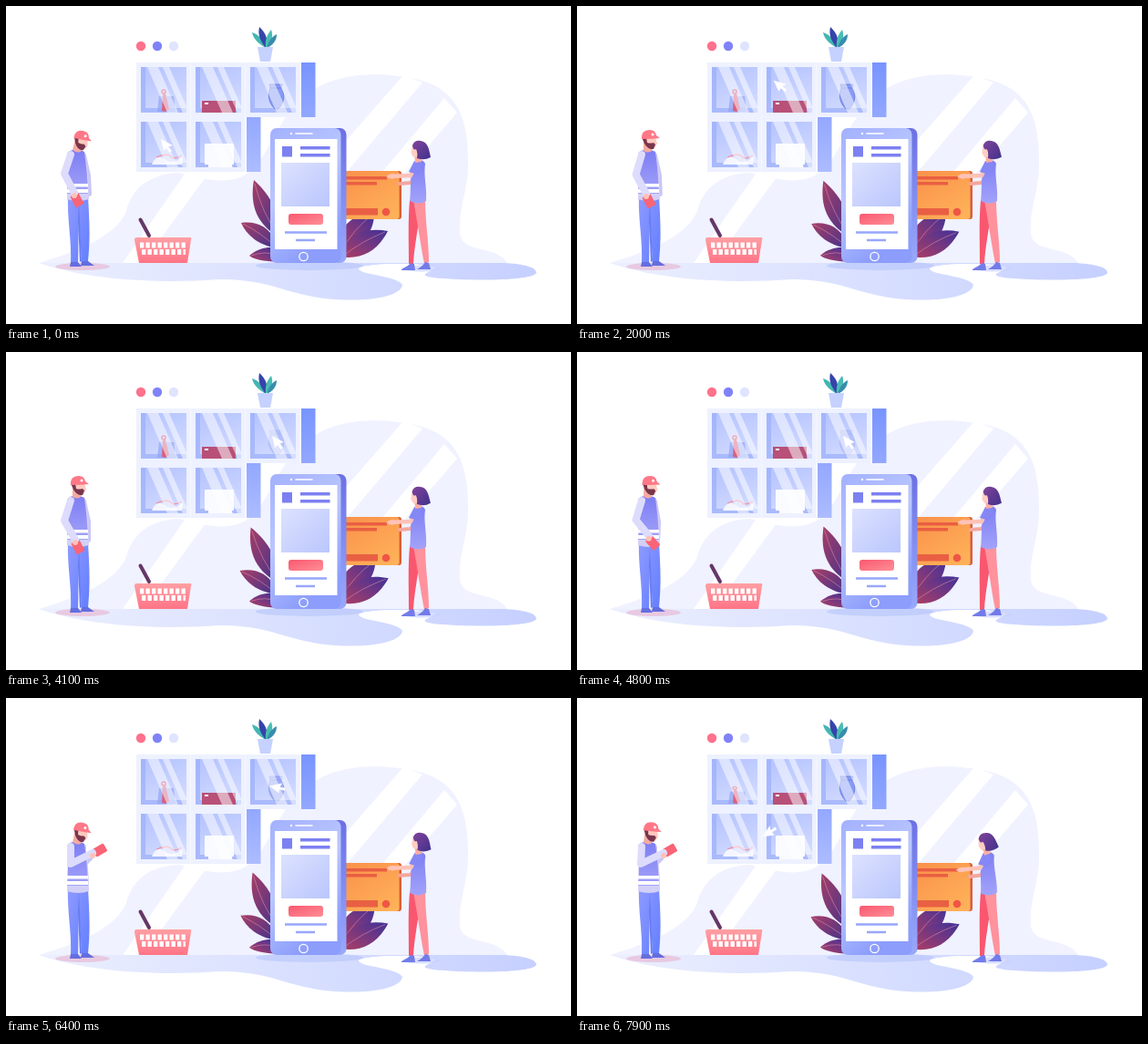
An HTML page that plays this animation: 620x349 px, repeating every 8000 ms.

```html
<!DOCTYPE html>
<html lang="en">
<head>
<meta charset="utf-8">
<title>Online shopping</title>
<style>
html, body { margin: 0; width: 100%; height: 100%; overflow: hidden; background: #fff; }
svg { display: block; width: 100%; height: 100%; }
</style>
</head>
<body>
<svg viewBox="0 0 620 349">
<defs>
  <linearGradient id="ground"><stop stop-color="#eceffe"/><stop offset=".5" stop-color="#d9e0ff"/><stop offset="1" stop-color="#c6d0ff"/></linearGradient>
  <linearGradient id="panel" x2="0" y2="1"><stop stop-color="#7894ff"/><stop offset="1" stop-color="#adbcff"/></linearGradient>
  <linearGradient id="window" x2=".4" y2="1"><stop stop-color="#b3c2ff"/><stop offset="1" stop-color="#d0d9ff"/></linearGradient>
  <linearGradient id="phone" x2=".4" y2="1"><stop stop-color="#a3b0ff"/><stop offset=".5" stop-color="#bac7ff"/><stop offset="1" stop-color="#8c9dfb"/></linearGradient>
  <linearGradient id="side" x2="0" y2="1"><stop stop-color="#6c70e4"/><stop offset="1" stop-color="#98a9fb"/></linearGradient>
  <linearGradient id="tile" x2="1" y2="1"><stop stop-color="#dde2ff"/><stop offset="1" stop-color="#bac6fd"/></linearGradient>
  <linearGradient id="red" x2="1" y2="1"><stop stop-color="#f9586f"/><stop offset="1" stop-color="#ff8f98"/></linearGradient>
  <linearGradient id="rose" x2="0" y2="1"><stop stop-color="#ff9fa4"/><stop offset="1" stop-color="#ff7486"/></linearGradient>
  <linearGradient id="card" x2="1" y2="1"><stop stop-color="#f98b48"/><stop offset="1" stop-color="#ffb45a"/></linearGradient>
  <linearGradient id="leaf" x2="1" y2="1"><stop stop-color="#a53e67"/><stop offset="1" stop-color="#40328e"/></linearGradient>
  <linearGradient id="leaf2" x1="1" x2="0" y2="1"><stop stop-color="#403199"/><stop offset="1" stop-color="#b03e63"/></linearGradient>
  <linearGradient id="vest" x2="0" y2="1"><stop stop-color="#7c7df3"/><stop offset="1" stop-color="#a3a3fa"/></linearGradient>
  <linearGradient id="jeans" x2="1" y2="1"><stop stop-color="#8f9aff"/><stop offset="1" stop-color="#637fff"/></linearGradient>
  <linearGradient id="hair" x2="1" y2="1"><stop stop-color="#81439a"/><stop offset="1" stop-color="#41318c"/></linearGradient>
  <g id="frame">
    <rect width="60" height="60" fill="#eef1ff"/>
    <path d="M60 0V60" stroke="#fff"/>
    <rect x="5" y="5" width="50" height="50" fill="url(#window)"/>
    <path d="M5 5H10V50H55V55H5Z" fill="#9eb1fb" opacity=".75"/>
  </g>
  <path id="glass" d="M12 5H24L46 55H34ZM29 5H36L55 48V55H51Z" fill="#fff" opacity=".52"/>
</defs>

<!-- backdrop -->
<path d="M36 282C70 272 120 255 132 225C138 200 158 184 190 183C225 193 255 198 275 175C295 148 300 122 330 97C365 70 415 73 449 80C500 91 508 130 507 178C506 205 496 225 498 250C501 272 538 262 550 282Z" fill="#f0f2ff"/>
<path d="M436 76L457 84L330 234L310 220ZM481 101L495 117L395 233L360 245ZM197 183L222 184L150 282H128Z" fill="#fff"/>
<path d="M36 282H548C575 284 582 288 582 293C578 301 520 302 480 299C450 297 455 292 470 288C465 281 400 282 388 287C380 294 431 296 435 306C434 319 395 326 350 321C300 314 290 300 235 300C170 305 90 301 36 282Z" fill="url(#ground)"/>
<path d="M388 288C400 281 460 282 472 287C466 292 455 294 462 297C445 301 430 299 416 296C402 294 388 293 388 288Z" fill="#fff"/>

<!-- shelf -->
<g fill="#dfe4ff"><circle cx="148" cy="44" r="5.2" fill="#ff718c"/><circle cx="166" cy="44" r="5.2" fill="#8083f8"/><circle cx="184" cy="44" r="5.2"/></g>
<path d="M285 46C279 42 272 38 270 29C277 31 283 37 285 46Z" fill="#43b6b2"/>
<path d="M285 46C279 38 276 32 278 23C286 30 288 38 285 46Z" fill="#3544a9"/>
<path d="M285 46C284 38 286 32 291 26C294 34 291 41 285 46Z" fill="#48bdb2"/>
<path d="M286 46C288 39 291 34 297 31C297 38 293 43 286 46Z" fill="#378dad"/>
<path d="M276 45H293L290 61H279Z" fill="#c5d1ff"/>
<path d="M324 62H339.500V122H324ZM264 122H279.500V182H264Z" fill="url(#panel)"/>
<g id="frames"></g>
<g id="bottle">
  <path d="M166 116L168 99H184L186 116Z" fill="#8ea2f4" opacity=".65"/>
  <circle cx="173" cy="94" r="2" fill="none" stroke="#df506f" stroke-width="1.500"/>
  <path d="M172 97L175 96L179 113L175 116L171 115Z" fill="#da617f"/>
</g>
<path d="M215 104H252V117H215Z" fill="#b85078"/><path d="M218 106H222V108H218Z" fill="#fff"/>
<g id="vase" fill="#879bf5" stroke="#6574d9" stroke-width=".8">
  <path d="M289 86H303L302 90C307 98 305 106 299 113H295C288 106 287 98 290 90Z"/><path d="M290 90H302" />
</g>
<path d="M155 174H194V177H155Z" fill="#a9bbfb"/>
<path d="M160 174C164 165 169 164 174 168C181 174 187 170 194 166L193 174Z" fill="#f4f5ff"/>
<path d="M165 166Q178 160 183 167Q188 167 193 164" fill="none" stroke="#f190a8" stroke-width="1.300"/>
<path d="M218 151H250V174H218ZM222 174H248V177H222Z" fill="#fafbff"/>
<g id="panes"></g>
<path id="cursor" d="M-6 -7L7 0L2 1.500L6 6L3.500 8L0 3L-3 6Z" fill="#fff"/>

<!-- basket -->
<path d="M147.500 234.500L157 252" stroke="#653767" stroke-width="4" stroke-linecap="round"/>
<path d="M143 254H202Q204 254 203 257L199 282H146L141 257Q141 254 143 254Z" fill="url(#rose)"/>
<path d="M147 262.500H199M149 270H197" stroke="#fff" stroke-width="6" stroke-dasharray="4.300 2.200"/>

<!-- phone and plants -->
<ellipse cx="333" cy="285" rx="59" ry="5" fill="#b9c6fb" opacity=".65"/>
<g id="leaves"></g>
<g id="card">
  <rect x="350" y="181" width="84" height="53" rx="3" fill="#d85d3c"/>
  <rect x="350" y="181" width="81.500" height="53" rx="3" fill="url(#card)"/>
  <path d="M360 187H418V190.500H360ZM360 193H407V196.500H360ZM360 222H408V229.500H360Z" fill="#e95f43"/>
  <circle cx="417" cy="226" r="4.300" fill="#ef5545"/>
</g>
<rect x="294" y="134" width="79.500" height="148" rx="7" fill="url(#side)"/>
<rect x="290" y="134" width="77.500" height="148" rx="7" fill="url(#phone)"/>
<rect x="295" y="146" width="68.500" height="121" fill="#fff"/>
<path d="M318 140H336" stroke="#fff" stroke-width="1.600" stroke-linecap="round"/><circle cx="313" cy="140" r="1.200" fill="#fff"/>
<path d="M303 154H314V165.500H303ZM323 154H355.500V157.500H323ZM323 162H355.500V165.500H323Z" fill="#7c80f1"/>
<rect x="302" y="172" width="53" height="48" fill="url(#tile)"/>
<rect x="310" y="228" width="38" height="12" rx="3" fill="url(#red)"/>
<path d="M306 248.500H352M318 257H339" stroke="#98a7fb" stroke-width="2.700"/>
<circle cx="326.500" cy="275" r="4.700" fill="none" stroke="#fff" stroke-width="1.300"/>

<!-- woman -->
<ellipse cx="456" cy="288" rx="21" ry="3.500" fill="#c8d2ff" opacity=".7"/>
<path d="M443 213H455C454 240 448 260 447 283H442C442 260 441 235 443 213Z" fill="#f9576f"/>
<path d="M447 213H460C460 235 464 260 464 281L459 283C455 263 452 240 447 213Z" fill="#ff929c"/>
<path d="M434 289Q442 285 444 282L448 283L449 290H434ZM451 289Q458 285 460 281L464 282L466 289Z" fill="#737be9"/>
<g id="woman">
  <path d="M450 185L444 194L432 195" fill="none" stroke="#f5a59d" stroke-width="4" stroke-linecap="round" stroke-linejoin="round"/>
  <path d="M449 170Q457 167 460 173C458 186 462 198 461 214Q453 219 443 214C445 204 442 184 449 170Z" fill="url(#vest)"/>
  <path d="M448 178L444 186L421 187" fill="none" stroke="#ffc2b7" stroke-width="4.500" stroke-linecap="round" stroke-linejoin="round"/>
  <path d="M417 187L424 184L430 186L424 190Z" fill="#ffc2b7"/>
  <path d="M448 170L457 173L452 185L442 182Z" fill="#8587f5"/>
  <g id="womanHead">
    <path d="M448 160H456V171L449 172Z" fill="#f8ada5"/>
    <path d="M446 152L445 158L444.500 161L447 166L454 165V151Z" fill="#ffcdc3"/>
    <path d="M446 153Q448 147 455 148C463 149 464 157 466 166Q459 170 451 167Q452 161 450 157Q447 159 446 153Z" fill="url(#hair)"/>
  </g>
</g>

<!-- man -->
<ellipse cx="84" cy="286" rx="30" ry="4" fill="#e8c3dc" opacity=".85"/>
<path id="farArm" fill="none" stroke="#c9c7f6" stroke-width="6" stroke-linecap="round" stroke-linejoin="round"/>
<path d="M68 208H90C91 230 93 250 90 280H83L80 233L79 281H71C72 255 67 235 68 208Z" fill="url(#jeans)"/>
<path d="M80 214L83 280L81 281L79 234Z" fill="#687cf2"/>
<path d="M71 281H79L83 286H70ZM83 280H90L97 285H82Z" fill="#636edf"/>
<path d="M69 160Q78 156 86 160Q91 180 91 212Q79 216 67 212Q68 185 67 162Z" fill="#d3d0f8"/>
<path d="M70 159Q79 156 86 160Q89 180 90 206H67Q69 185 67 162Z" fill="url(#vest)"/>
<path d="M67 195H90V198.500H67ZM67 201H90V205H67Z" fill="#fff"/>
<g id="manHead">
  <path d="M73 149H82V159Q78 162 73 159Z" fill="#f4aaa2"/>
  <path d="M74 144H86L88 151L85 156L76 155Z" fill="#ffc9be"/>
  <path d="M71 144H76L77 150Q80 151 84 150L86 152L84 157Q78 158 74 151Z" fill="#78364c"/>
  <path d="M71 146Q70 136 80 136Q86 136 87 142L91 145Q82 146 71 146Z" fill="#ff7887"/>
  <circle cx="83" cy="141" r="1.500" fill="#fff"/>
</g>
<rect id="device" x="-7" y="-5" width="14" height="10" rx="1.500" fill="#f96476"/>
<path id="nearArm" fill="none" stroke="#dddcfc" stroke-width="8" stroke-linecap="round" stroke-linejoin="round"/>
<circle id="hand" r="3" fill="#ffc2b7"/>
</svg>

<script>
const LOOP = 8000;
const el = id => document.getElementById(id);
const set = (id, name, value) => el(id).setAttribute(name, value);
const move = (id, value) => set(id, 'transform', value);

const cells = [[143, 62], [203, 62], [263, 62], [143, 122], [203, 122]];
const copies = id => cells.map(([x, y]) => `<use href="#${id}" x="${x}" y="${y}"/>`).join('');
el('frames').innerHTML = copies('frame');
el('panes').innerHTML = copies('glass');

// outline, vein, fill, pivot, sway in degrees
const leaves = [
  ['M300 254C276 240 267 220 272 191C291 208 301 229 300 254Z', 'M273 195Q281 227 299 252', 'leaf', '299 256', -3],
  ['M298 266C278 263 264 252 258 238C278 235 294 246 298 266Z', 'M260 239Q280 249 297 265', 'leaf', '298 266', -3],
  ['M299 281C282 280 272 278 267 274C278 264 291 264 299 266Z', 'M269 274Q285 268 298 274', 'leaf2', '299 274', 1],
  ['M366 270C363 246 375 230 404 225C405 248 391 264 366 270Z', 'M402 229Q380 246 369 268', 'leaf2', '368 270', 2],
  ['M366 275C374 248 397 243 419 247C407 270 389 279 366 275Z', 'M416 248Q390 258 369 275', 'leaf2', '368 275', 1.5]
];
el('leaves').innerHTML = leaves.map(([shape, vein, fill], i) =>
  `<g id="leaf-${i}"><path d="${shape}" fill="url(#${fill})"/><path d="${vein}" fill="none" stroke="#d78ba3" stroke-width=".6"/></g>`).join('');

// Each row is a time in seconds followed by its values
const cursor = [[0, 176, 153, 0], [.9, 174, 144, -50], [1.1, 175, 133, -70], [1.8, 205, 98, -30],
  [2.3, 255, 77, 10], [2.8, 291, 98, 20], [3.6, 298, 99, 0], [5.6, 298, 99, 0],
  [6.4, 298, 98, -40], [7.2, 258, 112, -70], [7.9, 211, 147, -85]];
const sway = [[0, 0], [1.2, 1], [2.75, 0], [4.05, 1], [5.4, 0], [6.4, .4], [7.9, 1]];
const manHead = [[0, 14], [.9, 0], [4.3, 0], [5.4, 7], [6.3, 13], [7.9, 8]];
// elbow, hand, device centre and angle
const arm = [[0, 64, 184, 75, 208, 78, 213, 62], [1.1, 64, 185, 76, 209, 79, 214, 62],
  [2.7, 65, 185, 76, 209, 79, 214, 62], [4.3, 64, 185, 76, 209, 79, 214, 62],
  [5.4, 66, 183, 85, 194, 92, 198, 20], [6.3, 71, 182, 95, 173, 103, 167, -30], [7.9, 70, 182, 95, 173, 102, 167, -30]];
const farArm = [[0, 90, 186, 91, 206], [4.3, 90, 186, 90, 206], [5.4, 87, 188, 86, 199], [6.3, 84, 184, 92, 176]];
const lean = [[0, 0, 0, 0], [1.4, 0, -1.5, 0], [2.8, 0, 0, 0], [4.2, 0, -1.5, 0], [5.4, 0, 0, 0], [6.4, .5, 1, 1], [7.9, -3, -8, -3]];
const bottle = [[0, 1], [7.2, 1], [7.5, 1.2], [7.9, .78]];
const vase = [[0, 1], [2.4, 1], [2.8, .3], [5.9, .3], [6.9, 1]];

// Smooth interpolation that never overshoots its keys
function at(keys, t) {
  const n = keys.length - 1;
  if (t >= keys[n][0]) return keys[n].slice(1);
  const i = keys.findIndex(key => key[0] > t) - 1;
  const span = keys[i + 1][0] - keys[i][0], u = (t - keys[i][0]) / span;
  return keys[i].slice(1).map((a, k) => {
    const c = k + 1, b = keys[i + 1][c];
    const slope = j => j < 0 || j >= n ? 0 : (keys[j + 1][c] - keys[j][c]) / (keys[j + 1][0] - keys[j][0]);
    const tangent = j => {
      const p = slope(j - 1), q = slope(j);
      return p * q > 0 ? 2 * p * q / (p + q) : 0;
    };
    return a + (b - a) * u * u * (3 - 2 * u)
      + span * u * (1 - u) * ((1 - u) * tangent(i) - u * tangent(i + 1));
  });
}

function draw(t) {
  const [cx, cy, turn] = at(cursor, t);
  move('cursor', `translate(${cx} ${cy}) rotate(${turn})`);

  const [s] = at(sway, t);
  leaves.forEach((leaf, i) => move('leaf-' + i, `rotate(${leaf[4] * s} ${leaf[3]})`));

  move('manHead', `rotate(${at(manHead, t)} 78 159)`);
  const [ex, ey, hx, hy, dx, dy, angle] = at(arm, t);
  set('nearArm', 'd', `M71 163L${ex} ${ey}L${hx} ${hy - 3}`);
  move('hand', `translate(${hx} ${hy})`);
  move('device', `translate(${dx} ${dy}) rotate(${angle})`);
  const [fx, fy, gx, gy] = at(farArm, t);
  set('farArm', 'd', `M85 164L${fx} ${fy}L${gx} ${gy}`);

  const [body, head, push] = at(lean, t);
  move('woman', `rotate(${body} 452 215)`);
  move('womanHead', `rotate(${head} 453 169)`);
  move('card', `translate(${push})`);

  const [stretch] = at(bottle, t);
  move('bottle', `translate(0 116) scale(1 ${stretch}) translate(0 -116)`);
  set('vase', 'opacity', at(vase, t)[0]);
}

const start = performance.now();
function tick() {
  draw((performance.now() - start) % LOOP / 1000);
  requestAnimationFrame(tick);
}
tick();
</script>
</body>
</html>
```
